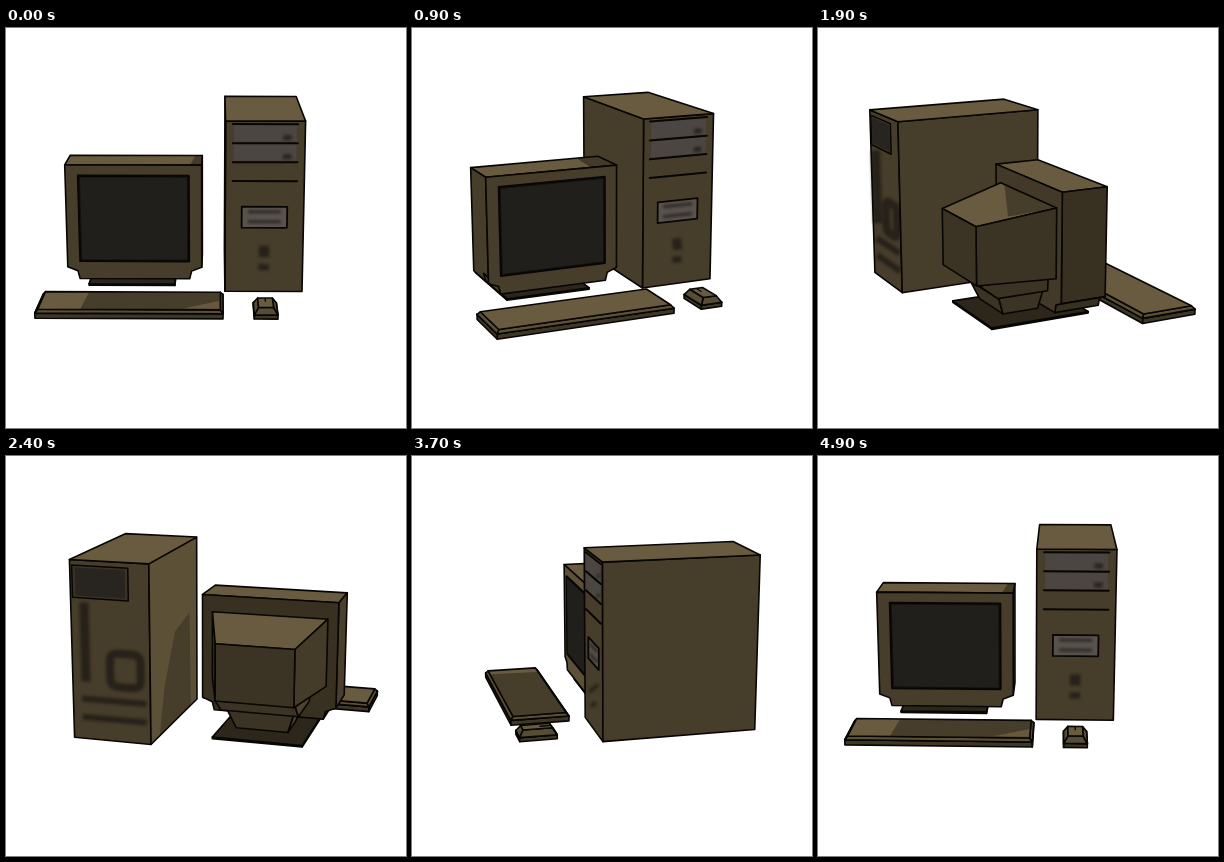
These frames come from a looping animation (400x400 px, 5000 ms). An HTML page with a canvas:

```html
<!DOCTYPE html>
<html lang="en">
<head>
<meta charset="utf-8">
<title>Desktop computer turntable</title>
<style>
html, body { margin: 0; width: 100%; height: 100%; overflow: hidden; background: #fff; }
canvas { display: block; width: 400px; height: 400px; }
</style>
</head>
<body>
<canvas id="stage" width="400" height="400"></canvas>
<script>
const ctx = document.getElementById('stage').getContext('2d');
const LOOP = 5000, STEP = 100, TURN = 2 * Math.PI;
const DIST = 1230, PITCH = TURN / 24;
const SP = Math.sin(PITCH), CP = Math.cos(PITCH);
const DARK = 0.59, INK = 'rgba(28,24,20,.75)';
const TOWER_X = 57, DESK_X = -70.5, FLOOR = -56, MAT = -59;

let sa = 0, ca = 1;

const clamp = v => Math.max(0, Math.min(1, v));

// one full turn: slow at the seam, quick in between
function angleAt(u) {
  const w = TURN * u;
  const deg = 360 * u - 7.1 - 29.1 * Math.sin(w - 0.119) - 9.9 * Math.sin(2 * w - 0.309);
  return deg * Math.PI / 180;
}

const turn = ([x, y, z]) => [x * ca + z * sa, y, z * ca - x * sa];

function project(p) {
  const [x, y, z] = turn(p);
  const k = DIST / (DIST - z * CP - y * SP);
  return [200 + k * x, 200 - k * (y * CP - z * SP)];
}

const tone = (b, alpha = 1) => `rgba(${120 * b | 0},${104 * b | 0},${72 * b | 0},${alpha})`;

function trace(pts) {
  ctx.beginPath();
  pts.forEach(p => ctx.lineTo(...project(p)));
}

function poly(pts, fill, line = 0) {
  trace(pts);
  ctx.closePath();
  if (fill) {
    ctx.fillStyle = fill;
    ctx.fill();
  }
  if (line) {
    ctx.lineWidth = line;
    ctx.strokeStyle = '#070604';
    ctx.stroke();
  }
}

function smudge(pts, width) {
  ctx.filter = 'blur(1.8px)';
  trace(pts);
  ctx.lineWidth = width;
  ctx.strokeStyle = INK;
  ctx.stroke();
  ctx.filter = 'none';
}

function isFront(pts) {
  const q = pts.map(project);
  return q.reduce((area, a, i) => {
    const b = q[(i + 1) % q.length];
    return area + a[0] * b[1] - b[0] * a[1];
  }, 0) < 0;
}

function normal(pts) {
  const [a, b, c] = pts.map(turn);
  const u = b.map((v, i) => v - a[i]), v = c.map((w, i) => w - a[i]);
  const n = [u[1] * v[2] - u[2] * v[1], u[2] * v[0] - u[0] * v[2], u[0] * v[1] - u[1] * v[0]];
  const len = Math.hypot(...n) || 1;
  return n.map(w => w / len);
}

const litSide = nx => clamp((nx - 0.82) / 0.12);

// joins two loops; faces are culled, shaded and outlined
function prism(a, b, tint = 1, deco = {}) {
  const faces = a.map((p, i) => {
    const j = (i + 1) % a.length;
    return [p, a[j], b[j], b[i]];
  });
  faces.push(b, [...a].reverse());
  faces.forEach((f, i) => {
    if (!isFront(f)) return;
    const n = normal(f);
    const light = n[1] > 0.3 ? 0.55 + 0.33 * n[1] : tint * (DARK + 0.18 * litSide(n[0]));
    poly(f, tone(light));
    if (deco[i]) deco[i](n);
    poly(f, null, 1.6);
  });
}

const rect = (cx, hw, y0, y1, z) =>
  [[cx - hw, y0, z], [cx + hw, y0, z], [cx + hw, y1, z], [cx - hw, y1, z]];
const ring = (cx, hw, z0, z1, y) =>
  [[cx - hw, y, z1], [cx + hw, y, z1], [cx + hw, y, z0], [cx - hw, y, z0]];
const flat = (pts, y) => pts.map(([x, z]) => [x, y, z]);

// layers of [rise, inset] on a rectangular foot
function stack(cx, hw, z0, z1, y, layers, tint, deco) {
  layers.forEach(([rise, inset]) => {
    const low = ring(cx, hw, z0, z1, y);
    hw -= inset;
    z0 += inset;
    z1 -= inset;
    y += rise;
    prism(low, ring(cx, hw, z0, z1, y), tint, deco);
  });
}

function towerFront() {
  const z = 32, x = TOWER_X;
  const line = (hw, y, width) => smudge([[x - hw, y, z], [x + hw, y, z]], width);
  for (let i = 0; i < 4; i++) {
    const y = 111 - 18.5 * i;
    if (i < 2) {
      poly(rect(x, 30, y - 17, y - 1, z), '#4b4642');
      smudge([[x + 17, y - 13, z], [x + 25, y - 13, z]], 5);
    }
    poly([[x - 31, y, z], [x + 31, y, z]], null, 2);
  }
  poly(rect(x, 22, 9, 30, z), '#59534d', 1.8);
  for (const y of [15, 25]) line(16, y, 3);
  line(5, -15, 11);
  line(5, -31, 6);
}

function towerBack() {
  const z = -118, left = TOWER_X + 38;
  const mark = (pts, width) => smudge(pts.map(([u, y]) => [left - u, y, z]), width);
  poly(rect(left - 29, 27, 79, 109, z), '#3b3225', 1.5);
  poly(rect(left - 29, 24, 81, 107, z), '#28241f');
  mark([[13, 0], [13, 75]], 9);
  const loop = Array.from({ length: 25 }, (_, i) => {
    const side = f => Math.sign(f) * Math.abs(f) ** 0.4;
    return [52 + 15 * side(Math.cos(TURN * i / 24)), 13 + 16 * side(Math.sin(TURN * i / 24))];
  });
  mark(loop, 8);
  for (const y of [-17, -35]) mark([[9, y], [72, y]], 6);
}

function towerLeft(n) {
  const pts = [[-56, -92], [-12, -76], [34, -42], [42, 6], [-56, 10]];
  poly(pts.map(([y, z]) => [TOWER_X - 38, y, z]), tone(DARK, litSide(n[0])));
}

function tower() {
  stack(TOWER_X, 38, -118, 32, FLOOR, [[170, 0]], 1,
    { 0: towerFront, 2: towerBack, 3: towerLeft });
}

function screen() {
  poly(rect(DESK_X, 54, -29, 58, 20), '#14120f', 2);
  poly(rect(DESK_X, 52, -27, 56, 20), '#211f1b');
}

function slabTop() {
  const w = 11 + 40 * clamp(sa);
  poly(flat([[-4 - w, 20], [-4, 20], [-4, -26], [-w, -26]], 68.5), tone(0.56, clamp(3 * ca)));
}

function slab() {
  const half = [[54.5, -47], [56.5, -39], [66.5, -35], [66.5, 68.5]];
  const shape = [...half, ...half.map(([x, y]) => [-x, y]).reverse()];
  const at = z => shape.map(([x, y]) => [DESK_X + x, y, z]);
  prism(at(-26), at(20), ca > 0 ? 1 : 0.8, { 3: slabTop, 8: screen });
}

function housingTop() {
  poly([[-22, 52, -26], [-128, 52, -26], [-110, 45, -66]], tone(DARK, clamp(2 * sa - 0.8)));
}

// neck, collar and picture tube behind the slab
function rear() {
  const tint = 0.84, x = -74;
  prism(ring(x, 25, -66, -30, -50), ring(x, 32, -74, -28, -30), tint);
  prism(ring(x, 37, -77, -26, -30), ring(x, 38, -96, -26, -15), tint);
  prism(rect(x, 37, -15, 39.5, -98), rect(DESK_X, 56.5, -14, 52, -26), tint, { 2: housingTop });
}

function monitor() {
  const foot = ring(-74, 43, -86, 14, FLOOR + 1.5);
  stack(-74, 43, -86, 14, FLOOR, [[1.5, 0]], 0.7, { 4: () => poly(foot, tone(0.38)) });
  const parts = [rear, slab];
  if (DIST * CP * ca < -26) parts.reverse();
  parts.forEach(f => f());
}

// the shadow of the big parts, with the corners that stay lit
function keyTop() {
  const near = clamp(4 * ca - 3), y = MAT + 8;
  const shade = clamp(1 - 4 * (sa - 0.05)) * clamp(4 * ca + 1);
  const edge = -138 + 25 * near;
  poly(flat([[edge - 3, 103], [14, 103], [14, 51], [edge, 51]], y), tone(DARK, shade));
  poly(flat([[-20, 100], [14, 100], [14, 77]], y), tone(0.86, near * shade));
}

function keyboard() {
  stack(DESK_X, 87.5, 48, 106, MAT, [[5, 0], [3, 2.5]], 0.9, { 4: keyTop });
}

function mouse() {
  const split = flat([[TOWER_X, 75], [TOWER_X, 85]], MAT + 10);
  stack(TOWER_X, 11, 70, 106, MAT, [[4, 0], [6, 4]], 0.9, { 4: () => poly(split, null, 1) });
}

function draw(ms) {
  const a = angleAt(Math.floor((ms % LOOP) / STEP) * STEP / LOOP);
  sa = Math.sin(a);
  ca = Math.cos(a);
  const eyeX = -DIST * CP * sa, eyeZ = DIST * CP * ca;
  const big = eyeX > 8 ? [monitor, tower] : [tower, monitor];
  const small = eyeX > 30 ? [keyboard, mouse] : [mouse, keyboard];
  ctx.fillStyle = '#fff';
  ctx.fillRect(0, 0, 400, 400);
  ctx.lineJoin = 'round';
  (eyeZ > 40 ? [...big, ...small] : [...small, ...big]).forEach(f => f());
}

const start = performance.now();
function tick() {
  draw(performance.now() - start);
  requestAnimationFrame(tick);
}
tick();
</script>
</body>
</html>
```
